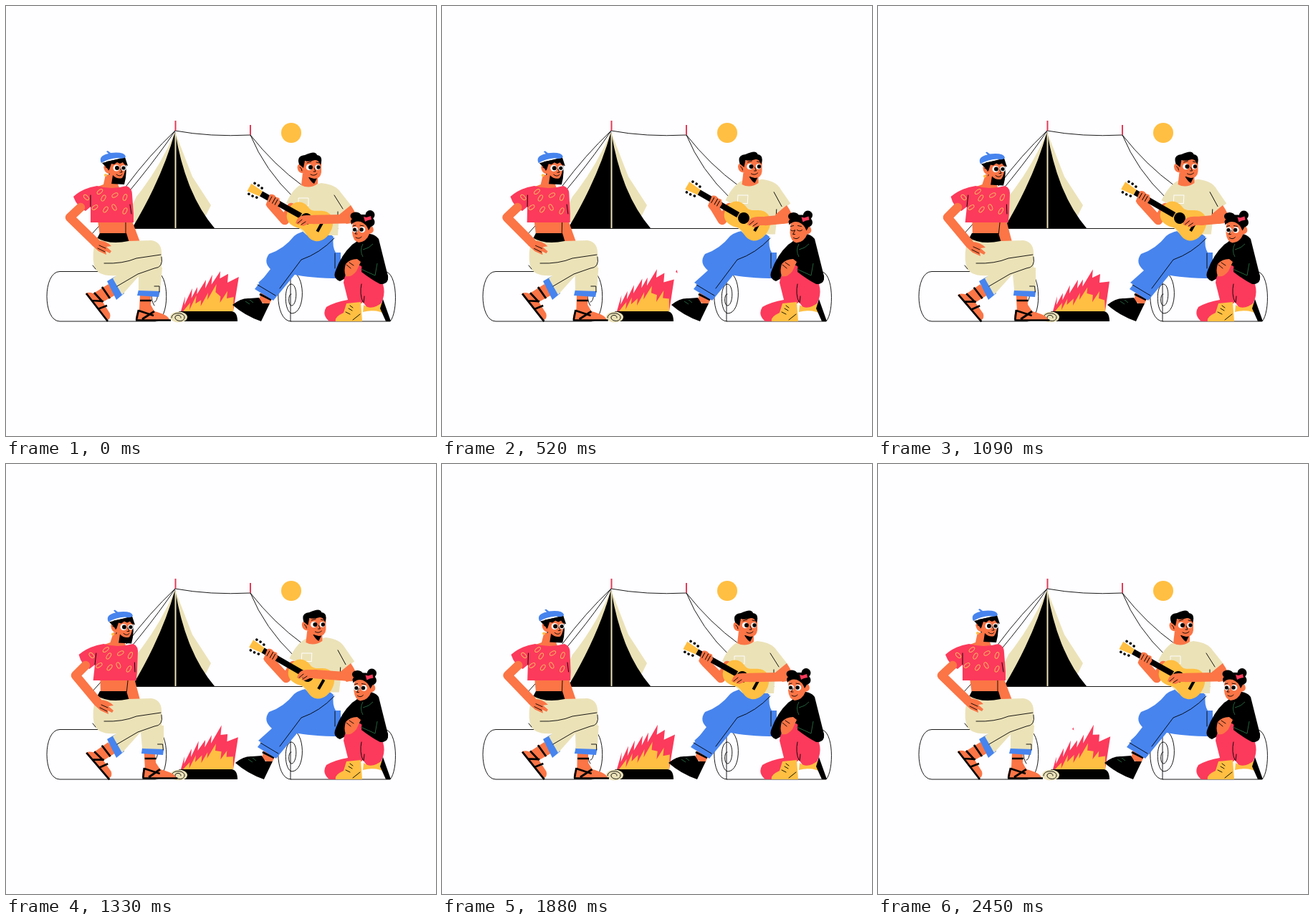
These frames come from a looping animation (600x600 px, 2550 ms). An HTML page:

```html
<!DOCTYPE html>
<html lang="en">
<head>
<meta charset="utf-8">
<title>Campfire</title>
<style>
html, body { margin: 0; height: 100%; overflow: hidden; background: #fefdff; }
svg { display: block; width: 100vw; height: 100vh; }
.skin { fill: #fb7546; }
.red { fill: #fc3a5b; }
.blue { fill: #4784ee; }
.sand { fill: #ebe2b8; }
.gold { fill: #ffbf42; }
.white { fill: #fefdff; }
.line { fill: none; stroke: #000; stroke-width: .9; stroke-linecap: round; stroke-linejoin: round; }
.strap { fill: none; stroke: #000; stroke-width: 2.7; }
.limb { fill: none; stroke: #fb7546; stroke-width: 12.5; stroke-linecap: round; stroke-linejoin: round; }
.outlined { stroke: #000; stroke-width: .9; }
</style>
</head>
<body>
<svg viewBox="0 0 600 600">
  <circle class="gold" cx="398" cy="177" r="14"/>

  <g id="tent">
    <path class="line" d="M236 174Q200 208 168 251M236 174Q194 237 119 319M236 174Q285 183 341 180Q374 222 414 251M341 180Q361 229 402 268M178 310.500H463"/>
    <path class="sand" d="M236 176Q213 228 182 266L173 285 177 300 190 310 279 292 286 278 260 238Z"/>
    <path d="M236 175Q218 240 176 310H291Q250 262 236 175Z"/>
    <path d="M236.500 177V310" stroke="#ebe2b8" stroke-width="2"/>
    <path d="M236.500 160V174M341 166V180" stroke="#e23c57" stroke-width="2"/>
  </g>

  <g id="logs">
    <path class="white outlined" d="M208 370.500H75C51 370.500 51 440 75 440H208C229 440 229 370.500 208 370.500Z"/>
    <path class="line" d="M207 418C201 410 202 390 208 391C214 393 212 414 207 413"/>
    <path class="white outlined" d="M397 370.500H528C547 370.500 547 428 536 440H397Z"/>
    <path class="line" d="M397 440C374 439 374 371 397 370.500C418 371 419 428 399 429C388 428 387 389 398 388C408 389 406 419 398 418C393 417 394 401 398 402"/>
  </g>

  <g id="fire">
    <path id="flame" class="red"/>
    <path id="core" class="gold"/>
    <path id="spark" class="red"/>
    <path d="M241 426H315Q323 427 323 440H241Z"/>
    <ellipse class="sand" cx="241" cy="434" rx="12" ry="7.500"/>
    <path class="line" d="M231 435C231 426 250 427 249 435C248 442 235 440 236 434C237 430 245 431 244 435"/>
  </g>

  <g id="man">
    <g id="shin">
      <path class="skin" d="M356 399L372 407 366 419 353 411Z"/>
      <path class="strap" d="M354 402L370 410"/>
      <path d="M316 417Q328 407 340 408L353 407 358 415 368 415 356 440Q333 432 316 417Z"/>
      <path d="M334 412l6 4m0-6l5 4" stroke="#23613b"/>
      <path class="blue" d="M397 351L411 365 373 411 347 395 373 362Z"/>
      <path class="line" d="M351 389L376 404"/>
    </g>
    <path class="blue" d="M402 321Q413 312 432 313Q450 315 457 322Q455 336 460 344H467V380Q425 380 399 374L378 402 352 386 371 369Q358 358 367 346Q388 339 402 321Z"/>
    <path class="line" d="M458 324Q438 345 412 354L382 394M459 345V366"/>
    <g id="manTorso">
      <path class="sand" d="M412 249Q426 252 440 247Q460 249 467 260L482 279 465 291 463 320H420L395 298 400 279 391 275Q400 255 412 249Z"/>
      <path class="line" d="M458 264L470 283M463 287V298"/>
      <path d="M408 268h14v11h-14z" fill="none" stroke="#fefdff"/>
    </g>
    <g id="manHead">
      <path class="skin" d="M414 233L412 250Q423 256 435 248L435 237Z"/>
      <path d="M422 239L435 238 430 248Q426 246 422 239Z"/>
      <path class="skin" d="M411 220Q405 221 407 228Q409 234 415 233Q420 239 430 241Q439 241 440 232V215Q424 211 411 220Z"/>
      <path d="M409 221Q405 209 417 208Q432 201 434 208Q443 209 439 222Q436 214 431 215Q422 218 417 216L415 226Z"/>
      <path class="line" d="M410 225q3 1 3 5M420 219l6-2M433 218l5 1M430 226l2 5h-3M425 235q5 3 9-1"/>
      <circle class="white" cx="423" cy="225" r="4.300"/><circle class="white" cx="435" cy="225" r="3.700"/>
      <circle cx="425" cy="225" r="3"/><circle cx="436" cy="225" r="2.700"/>
    </g>
    <path id="fretArm" class="limb"/>
    <g id="guitar">
      <path class="gold" d="M-28 0C-28-17-14-20-4-15C6-11 12-25 25-22C42-18 43 15 26 21C13 25 8 13-2 16C-15 20-28 16-28 0Z"/>
      <path class="gold" d="M-72-4L-91-6V6L-72 4Z"/>
      <circle r="8"/>
      <path d="M-72-4H-9V4H-72ZM20-7h4V8h-4Z"/>
      <path d="M-87-8.500h.1M-81-8.500h.1M-75-7.500h.1M-87 8.500h.1M-81 8.500h.1M-75 7.500h.1" stroke="#000" stroke-width="3.500" stroke-linecap="round"/>
      <g id="fretHand">
        <path class="skin" d="M-8-5Q-3-9 1-6L6-7 10-2 9 10Q2 16-6 10Z"/>
        <path class="line" d="M-4-4L-4 4M1-5L1 4M5-4V4"/>
      </g>
    </g>
    <path class="skin" d="M465 291L481 278Q492 294 489 301L475 304Z"/>
    <path id="strumArm" class="limb"/>
    <g id="strumHand">
      <path class="skin" d="M17-6L4-6Q-6-6-9 0L-11 5-7 7-2 4-5 8 0 9 7 6 18 6Z"/>
      <path class="line" d="M-8 5L-2 0M-3 7L3 3"/>
    </g>
  </g>

  <g id="girl">
    <path d="M497 319Q512 315 520 325L533 377Q534 388 522 388L494 372 477 378 466 384Q455 380 460 369Q468 347 483 333Q493 327 497 319Z"/>
    <path class="red" d="M480 367Q485 360 494 362L504 368Q515 377 526 388Q531 406 520 420Q512 425 504 421L498 413 466 440H451Q440 431 447 420Q459 413 477 410L471 386Q472 374 480 367Z"/>
    <path d="M497 350L520 345 533 377Q534 388 522 388Q510 382 496 371Z"/>
    <path class="line" d="M496 388Q493 402 498 413M499 414L500 405"/>
    <path class="gold" d="M475 415L495 413 497 440H460Q458 434 471 428ZM499 417Q510 426 526 413L531 431Q518 422 498 427Z"/>
    <path class="line" d="M480 418l4 3M478 422l5 3M474 427l6 3M494 430l-10 8"/>
    <path d="M526 409L537 440H530L522 422Z"/>
    <path class="skin" d="M474 360Q480 353 490 353L495 357 489 370Q482 379 474 377Q471 369 474 360Z"/>
    <path class="line" d="M475 361L481 366M479 358L485 362"/>
    <path d="M498 332Q493 341 498 350M512 332Q507 338 498 340M518 359L515 376L495 367" fill="none" stroke="#23613b"/>
    <g id="girlHead">
      <path class="skin" d="M485 298Q483 306 483 316Q484 328 492 330Q503 329 507 318Q515 316 512 309L505 298Z"/>
      <circle cx="508" cy="291.500" r="6.500"/>
      <ellipse cx="488" cy="293" rx="7.500" ry="5.500"/>
      <path d="M481 300Q486 289 497 291Q510 290 514 299Q516 306 509 308L506 313Q503 304 495 301Q487 299 482 305Z"/>
      <path class="red" d="M499 294l4 1 6-2 1 5-5 1-4 2Z"/>
      <g id="girlEyes">
        <circle class="white" cx="487" cy="312" r="3.900"/><circle class="white" cx="497" cy="312" r="4.300"/>
        <circle cx="486.500" cy="312" r="2.600"/><circle cx="496" cy="312" r="2.800"/>
      </g>
      <path id="girlLids" class="line" d="M484 312q3 3 6 0M493 312q4 3 7 0"/>
      <path class="line" d="M484 307l4-1M494 306l5 1M490 313l-3 5h3M488 323q5 3 8-1"/>
    </g>
  </g>

  <g id="woman">
    <g id="backFoot">
      <path class="skin" d="M187 403L186 423Q179 433 182 438H228Q227 431 207 426L202 417V403Z"/>
      <path class="strap" d="M187 411H203M185 425L206 432M190 437L207 426M185 424L182 438M181 438.500H230"/>
      <path class="blue" d="M185 396L215 397 213 406 183 404Z"/>
      <path class="sand" d="M185 365H218L215 398 185 397Z"/>
      <path class="line" d="M207 391H214V399"/>
    </g>
    <g id="frontFoot">
      <path class="skin" d="M143 388L122 401Q113 398 111 402L141 439Q147 436 145 429L135 413 153 403Z"/>
      <path class="strap" d="M134 392L145 408M123 400L135 413M120 411L136 412M128 423L141 418M112 401L142 440"/>
    </g>
    <path class="blue" d="M153 377L141 384 154 410 165 401Z"/>
    <g id="womanTorso">
      <path class="skin" d="M166 298L176 300 188 332H168ZM128 299H168V321H131Z"/>
      <path class="line" d="M167 302V318"/>
    </g>
    <path d="M131 317H168L172 330H124Z"/>
    <path class="sand" d="M126 323Q144 334 171 328L203 327Q216 329 217 343V366L187 375 162 403 149 380 154 376Q128 378 123 363Q119 345 126 323Z"/>
    <path class="line" d="M137 359Q163 360 182 352L216 347M217 350Q220 365 207 366L184 374 155 391M121 362l4 5M130 339l8 4"/>
    <g id="womanTop">
      <path class="skin" d="M139 235L136 249 120 255 160 259 152 237Z"/>
      <path class="red" d="M127 251Q147 257 168 251Q176 254 176 263L178 290 178 302H118V280L111 286Q99 280 94 266Q107 254 127 251Z"/>
      <path class="line" d="M118 264V280M173 277L175 290"/>
      <g id="beans" fill="none" stroke="#ffb45d"></g>
    </g>
    <path id="womanArm" class="limb"/>
    <g id="womanHand">
      <path class="skin" d="M116 320L128 327Q139 327 147 335L140 336 147 342 145 345 139 342 140 347 129 342 120 334Z"/>
      <path class="line" d="M130 334L139 338M128 338L138 343"/>
    </g>
    <g id="womanHead">
      <path d="M140 217L166 212Q170 232 165 249L146 248Z"/>
      <path class="skin" d="M144 218Q134 221 137 228Q139 234 145 234L139 243 140 251 147 249 149 236Q155 242 162 240Q167 234 167 217Z"/>
      <path d="M134 219L166 211 170 223 165 221 163 218 159 220 155 218 151 221 147 220 144 229Z"/>
      <path class="blue" d="M133 219Q128 209 143 206L140 203 142 202 146 205Q165 203 167 210Q165 214 156 212Q142 213 133 219Z"/>
      <circle class="gold" cx="139" cy="236" r="2"/>
      <circle class="white" cx="154" cy="226" r="4.500"/><circle class="white" cx="164" cy="226" r="3.800"/>
      <circle cx="155" cy="226" r="3"/><circle cx="164" cy="226" r="2.600"/>
      <path class="line" d="M160 227l2 5h-3M154 235q5 4 8 0M139 225q3 0 4 4"/>
    </g>
  </g>
</svg>
<script>
const LOOP = 2550;
const el = id => document.getElementById(id);
const attr = (id, name, value) => el(id).setAttribute(name, value);
const move = (id, x, y = 0) => attr(id, 'transform', `translate(${x} ${y})`);
// Shifts and stretches a part in proportion to its height above the pivot.
const lean = (id, k, pivot, stretch = 0) =>
  attr(id, 'transform', `matrix(1 0 ${-k} ${1 + stretch} ${k * pivot} ${-stretch * pivot})`);
const ease = (t, a, b) => {
  const u = Math.min(1, Math.max(0, (t - a) / (b - a)));
  return u < .5 ? 4 * u ** 3 : 1 - 4 * (1 - u) ** 3;
};
const track = (t, keys) => {
  let value = keys[0][1];
  for (let i = 1; i < keys.length; i++)
    value += (keys[i][1] - keys[i - 1][1]) * ease(t, keys[i - 1][0], keys[i][0]);
  return value;
};

const beans = [[112, 267, -45], [131, 259, 50], [136, 268, 30], [124, 281, 55],
  [139, 284, 35], [152, 264, 60], [166, 267, 20], [151, 281, -30], [166, 286, 25]];
el('beans').innerHTML = beans.map(([x, y, a]) =>
  `<ellipse rx="2.400" ry="4.500" transform="translate(${x} ${y}) rotate(${a})"/>`).join('');

const redTips = [[250, 405], [259, 397], [268, 389], [279, 382], [287, 378], [300, 367], [310, 374], [324, 381]];
const goldTips = [[257, 414], [265, 406], [273, 408], [282, 400], [293, 390], [300, 403], [309, 398], [317, 408]];
const sparks = [[430, 326], [700, 292], [1490, 270], [2350, 271]];

function flame(tips, t, left, right, depth, sway) {
  let d = `M${left} 426`;
  tips.forEach(([x, y], i) => {
    const rise = sway * Math.sin(t / LOOP * Math.PI * 2 * (7 + i % 3) + i * 2.1);
    d += `L${x + rise * .3} ${y - rise}`;
    if (i < tips.length - 1) d += `L${x - 1 + rise * .2} ${y + depth - rise * .4}`;
  });
  return d + `L${right} 426Z`;
}

function drawFire(t) {
  attr('flame', 'd', flame(redTips, t, 244, 317, 12, 3.5));
  attr('core', 'd', flame(goldTips, t, 247, 317, 10, 2.5));
  attr('spark', 'd', sparks.map(([start, x]) => {
    const u = (t - start) / 180;
    if (u < 0 || u > 1) return '';
    const size = 6 * (1 - u);
    return `M${x} ${379 - 16 * u}l${size * .6} ${-size} ${size * .3} ${size * 1.6}Z`;
  }).join(''));
}

function drawWoman(t) {
  const w = ease(t, 350, 830) - ease(t, 1590, 2100);
  lean('womanTorso', .11 * w, 330);
  lean('womanTop', .11 * w, 335);
  move('womanHead', 10 * w, 1.5 * w);
  move('womanHand', 3 * w, 2 * w);
  lean('backFoot', -.1 * w, 345);
  attr('frontFoot', 'transform', `rotate(${-3 * w} 148 396)`);
  attr('womanArm', 'd', `M${104 + 7 * w} 281L${89 + 8 * w} 295 ${124 + 3 * w} ${329 + 2 * w}`);
}

function drawMan(t) {
  const m = ease(t, 0, 490) - ease(t, 1240, 1760);
  lean('manTorso', .06 * m, 350, .05 * m);
  move('manHead', 6.5 * m, -m);
  move('shin', 4 * m);
  move('girlHead', 2.5 * m, .5 * m);

  const gx = 419 + 2 * m, gy = 297 - m, angle = 29 + m;
  const slide = track(t, [[0, -53], [430, -46], [790, -46], [1050, -59], [1600, -60], [1880, -58], [2450, -53]]);
  const rad = angle * Math.PI / 180;
  attr('guitar', 'transform', `translate(${gx} ${gy}) rotate(${angle})`);
  move('fretHand', slide);
  attr('fretArm', 'd', `M${gx + slide * Math.cos(rad) - 1} ${gy + slide * Math.sin(rad) + 8}L${389 + 2 * m} 299L${398 + 3 * m} 281`);

  const strum = t < 245 || t > 2425 ? 0 : .5 - .5 * Math.cos((t - 245) / 545 * Math.PI * 2);
  const lift = m * (1 - strum);
  const hx = 415 + 22 * strum + 2 * lift, hy = 298 + 2 * strum - 5 * lift;
  attr('strumArm', 'd', `M482 297L${hx + 14} ${hy}`);
  move('strumHand', hx, hy);
}

function draw() {
  const t = performance.now() % LOOP;
  drawFire(t);
  drawWoman(t);
  drawMan(t);
  const blink = t > 450 && t < 590;
  attr('girlEyes', 'visibility', blink ? 'hidden' : 'visible');
  attr('girlLids', 'visibility', blink ? 'visible' : 'hidden');
  requestAnimationFrame(draw);
}
draw();
</script>
</body>
</html>
```
